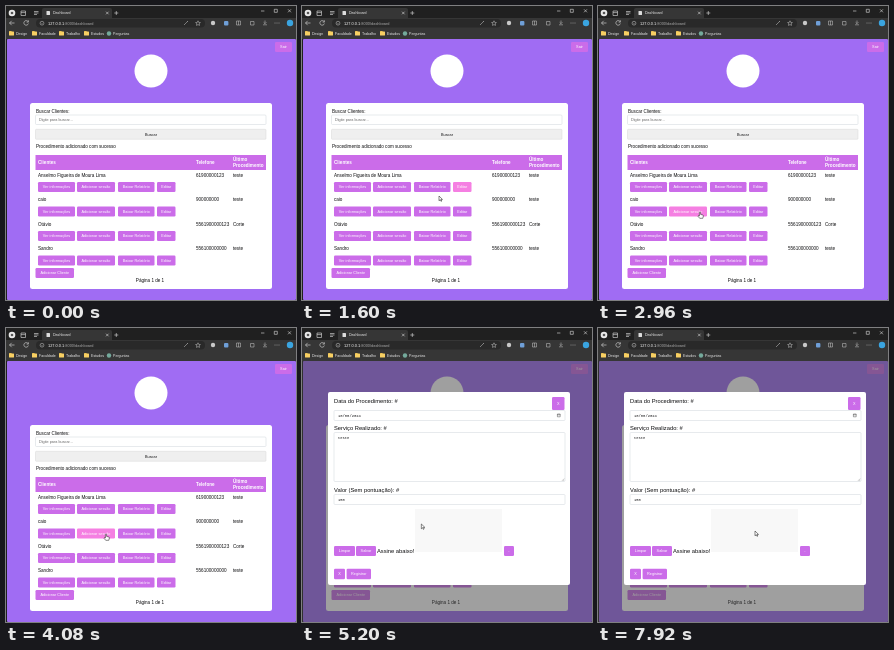
An HTML page for the animation above (8 s loop, 290 by 294 pixels).

```html
<!DOCTYPE html>
<html lang="pt">
<head>
<meta charset="utf-8">
<title>Dashboard</title>
<style>
html, body { margin: 0; width: 100%; height: 100%; overflow: hidden; background: #202020; }
svg { display: block; width: 290px; height: 294px; }
text { font-family: "Liberation Sans", Arial, sans-serif; white-space: pre; }
.mono { font-family: "Liberation Mono", monospace; }
</style>
</head>
<body>
<svg id="stage" viewBox="0 0 290 294"></svg>
<script>
const PURPLE = '#a06cf3', PINK = '#cb6ce9', HOVER = '#f57fe2', INK = '#0c0c0e';
const LOOP = 8000, OPEN = 4120;

const rect = (x, y, w, h, fill, r = 0, extra = '') =>
  `<rect x="${x}" y="${y}" width="${w}" height="${h}" rx="${r}" fill="${fill}" ${extra}/>`;
const dot = (x, y, r, fill) => `<circle cx="${x}" cy="${y}" r="${r}" fill="${fill}"/>`;
const line = (d, color = '#ddd', w = .6) =>
  `<path d="${d}" fill="none" stroke="${color}" stroke-width="${w}"/>`;
// y is the vertical middle of the text
const text = (s, x, y, size = 4.6, fill = INK, extra = '') =>
  `<text x="${x}" y="${y + size * .35}" font-size="${size}" fill="${fill}" ${extra}>${s}</text>`;
const mid = 'text-anchor="middle"';
const bold = 'font-weight="700"';
const button = (s, x, y, w, id = '', h = 10) =>
  `<g>${rect(x, y, w, h, PINK, 1.2, id && `id="${id}"`)}${text(s, x + w / 2, y + h / 2, 3.8, '#fff', mid)}</g>`;
const field = (x, y, w, h) => rect(x, y, w, h, '#fff', 1, 'stroke="#ced4da" stroke-width=".5"');

function browser() {
  let s = rect(0, 0, 290, 33, '#202020') + rect(0, 12, 290, 21, '#363636');
  s += `<path d="M36 12.5V4q0-2 2-2h66q2 0 2 2v8.5z" fill="#363636"/>`;
  s += dot(6, 7, 3.3, '#e8e8e8') + dot(6, 7, 1.3, '#555');
  s += line('M15 5h4.5v4.5h-4.5zM15 6.6h4.5M28 5.5h4.5M28 7h4.5M28 8.5h3');
  s += rect(40.5, 5, 3.5, 4, '#ddd', .6) + text('Dashboard', 47, 7, 3.6, '#eee');
  s += line('M100 5.7l2.6 2.6m0-2.6l-2.6 2.6M108.3 7h4M110.3 5v4');
  s += line('M255 5h3.4M268.3 3.3h3v3h-3zM282 3.3l3 3m0-3l-3 3');
  s += line('M8.5 17h-5m2.2-2.2L3.5 17l2.2 2.2M22 15.5a2.3 2.3 0 1 0 .4 2M22.4 14.3v1.8h-1.8');
  s += rect(30, 13, 169, 8.6, '#292929', 4);
  s += `<circle cx="36" cy="17.2" r="1.9" fill="none" stroke="#ccc" stroke-width=".5"/>` + line('M36 16.9v1.3', '#ccc', .5);
  s += text('127.0.0.1<tspan fill="#aaa">:8000/dashboard</tspan>', 42, 17.2, 3.9, '#fff');
  s += line('M178 19l3.5-3.5M181 15l1 1M192 14.8l.7 1.6 1.7.2-1.2 1.1.3 1.7-1.5-.8-1.5.8.3-1.7-1.2-1.1 1.7-.2z', '#ccc', .5);
  s += dot(207, 17, 2.2, '#c9c9c9') + rect(218, 15, 4.4, 4.4, '#6f9fd8', 1);
  s += line('M230.5 15h4v4h-4zM232.5 15v4M244.5 15.5h3.5v3.5h-3.5zM257 18.8h4M259 14.5v3m-1.4-1.2l1.4 1.4 1.4-1.4', '#ccc', .5);
  s += [269, 271, 273].map(x => dot(x, 17, .45, '#ddd')).join('') + dot(284, 17, 3.2, '#3aa4e0');
  [['Design', 3], ['Faculdade', 26], ['Trabalho', 53], ['Estudos', 78]].forEach(([name, x]) => {
    s += rect(x, 25, 2.6, 2, '#e5b847', .4) + rect(x, 25.6, 5, 3.8, '#f7cf63', .5);
    s += text(name, x + 7, 27.5, 3.6, '#eee');
  });
  return s + dot(103, 27.5, 2.2, '#74aa9c') + text('Perguntas', 107, 27.5, 3.6, '#eee');
}

function dashboard() {
  let s = rect(1, 33, 289, 261, PURPLE, 1);
  s += button('Sair', 269, 36, 17) + dot(145, 65, 16.5, '#fff');
  s += rect(24, 97, 242, 186, '#fff', 2.5) + text('Buscar Clientes:', 30, 105);
  s += field(29.5, 109, 230.5, 9.5) + text('Digite para buscar...', 33, 113.6, 3.8, '#666');
  s += rect(29.5, 123.3, 230.5, 10, '#efefef', .8, 'stroke="#cfcfcf" stroke-width=".4"');
  s += text('Buscar', 145, 128.3, 3.8, INK, mid);
  s += text('Procedimento adicionado com sucesso', 30, 140.5);
  s += rect(29.5, 149, 230.5, 15, PINK);
  [['Clientes', 32, 156.3], ['Telefone', 190, 156.3], ['Último', 227, 153.6], ['Procedimento', 227, 159.2]]
    .forEach(([t, x, y]) => s += text(t, x, y, 4.6, '#fff', bold));
  [['Anselmo Figueira de Moura Lima', '61900000123', 'teste'],
   ['caio', '900000000', 'teste'],
   ['Otávio', '5561900000123', 'Corte'],
   ['Sandro', '556100000000', 'teste']].forEach(([name, phone, job], i) => {
    const y = 169 + i * 24.5;
    s += text(name, 32, y) + text(phone, 190, y) + text(job, 227, y);
    s += button('Ver informações', 32, y + 7, 37) + button('Adicionar sessão', 71, y + 7, 38, 'add' + i);
    s += button('Baixar Relatório', 112, y + 7, 36.5) + button('Editar', 151, y + 7, 18.5, 'edit' + i);
  });
  return s + button('Adicionar Cliente', 29.5, 262, 38.5) + text('Página 1 de 1', 144, 274.5, 4.6, INK, mid);
}

function modal() {
  const mono = 'class="mono"';
  let s = rect(0, 33, 290, 261, 'rgba(64,64,64,.5)') + rect(26, 64, 242, 193, '#fff', 2);
  s += text('Data do Procedimento: #', 32, 72.5, 5.75) + button('X', 250, 69, 12.5, '', 13);
  s += field(32, 82.5, 231, 10) + text('10/08/2024', 36, 87.5, 3.8, INK, mono);
  s += line('M255.4 86h2.8v2.8h-2.8zM255.4 86.8h2.8', '#222', .4);
  s += text('Serviço Realizado: #', 32, 100.3, 5.75) + field(32, 104.5, 231, 49);
  s += text('teste', 36, 109.5, 3.8, INK, mono) + line('M260 152.8l2.2-2.2M261.3 152.8l.9-.9', '#777', .4);
  s += text('Valor (Sem pontuação): #', 32, 162.3, 5.75) + field(32, 166.5, 231, 10);
  s += text('150', 36, 171.5, 3.8, INK, mono) + rect(113, 181, 87, 43, '#f8f8f8');
  s += button('Limpar', 32, 218, 21) + button('Salvar', 54, 218, 20);
  s += text('Assine abaixo!', 75, 222.5, 5.75) + button('-', 202, 218, 10);
  return s + button('X', 32, 240.7, 11, '', 10.6) + button('Registrar', 44.6, 240.7, 24.4, '', 10.6);
}

const arrow = '<path d="M0 0V4.8L1.2 3.7 2 5.4 2.8 5 2 3.4H3.5z"/>';
const hand = '<path d="M-.6 .3Q0-.5.6.3V2.4L3 3.1Q3.5 3.3 3.4 4L2.8 6.3H-.3L-2 4.2Q-1.8 3.1-.6 4z"/>';
const skin = 'fill="#fff" stroke="#111" stroke-width=".5"';

const stage = document.getElementById('stage');
stage.innerHTML = browser() + dashboard() + `<g id="modal">${modal()}</g>` +
  `<g id="cursor"><g id="arrow" ${skin}>${arrow}</g><g id="hand" ${skin}>${hand}</g></g>`;
const el = id => document.getElementById(id);

// time, x, y of the pointer
const path = [
  [0, 294, 297], [160, 294, 297], [900, 190, 196], [1200, 161, 181], [1480, 158, 183],
  [1600, 137, 190], [2000, 118, 199], [2500, 102, 206], [3400, 102, 206], [4000, 100, 206],
  [4700, 100, 206], [5100, 117, 197], [5360, 124, 194], [5560, 126, 199], [5760, 122, 212],
  [6000, 119, 209], [6240, 129, 205], [6480, 127, 210], [6720, 132, 206], [6900, 136, 211],
  [7120, 141, 199], [7360, 146, 210], [7600, 138, 206], [7800, 153, 204], [7920, 157, 203], [8000, 157, 203]
];

function pointer(t) {
  const i = Math.max(1, path.findIndex(p => p[0] >= t));
  const [t0, x0, y0] = path[i - 1], [t1, x1, y1] = path[i];
  const k = (t - t0) / (t1 - t0), e = k * k * (3 - 2 * k);
  return [x0 + (x1 - x0) * e, y0 + (y1 - y0) * e];
}

function draw(now) {
  const t = now % LOOP, open = t >= OPEN;
  const [x, y] = pointer(t);
  const onEdit = t >= 1100 && t < 1640, onAdd = t >= 2300 && !open;
  el('modal').style.display = open ? '' : 'none';
  el('edit0').setAttribute('fill', onEdit ? HOVER : PINK);
  el('add1').setAttribute('fill', onAdd ? HOVER : PINK);
  const pointing = onAdd || (onEdit && t < 1500);
  el('hand').style.display = pointing ? '' : 'none';
  el('arrow').style.display = pointing ? 'none' : '';
  el('cursor').setAttribute('transform', `translate(${x} ${y})`);
  requestAnimationFrame(draw);
}
requestAnimationFrame(draw);
</script>
</body>
</html>
```
